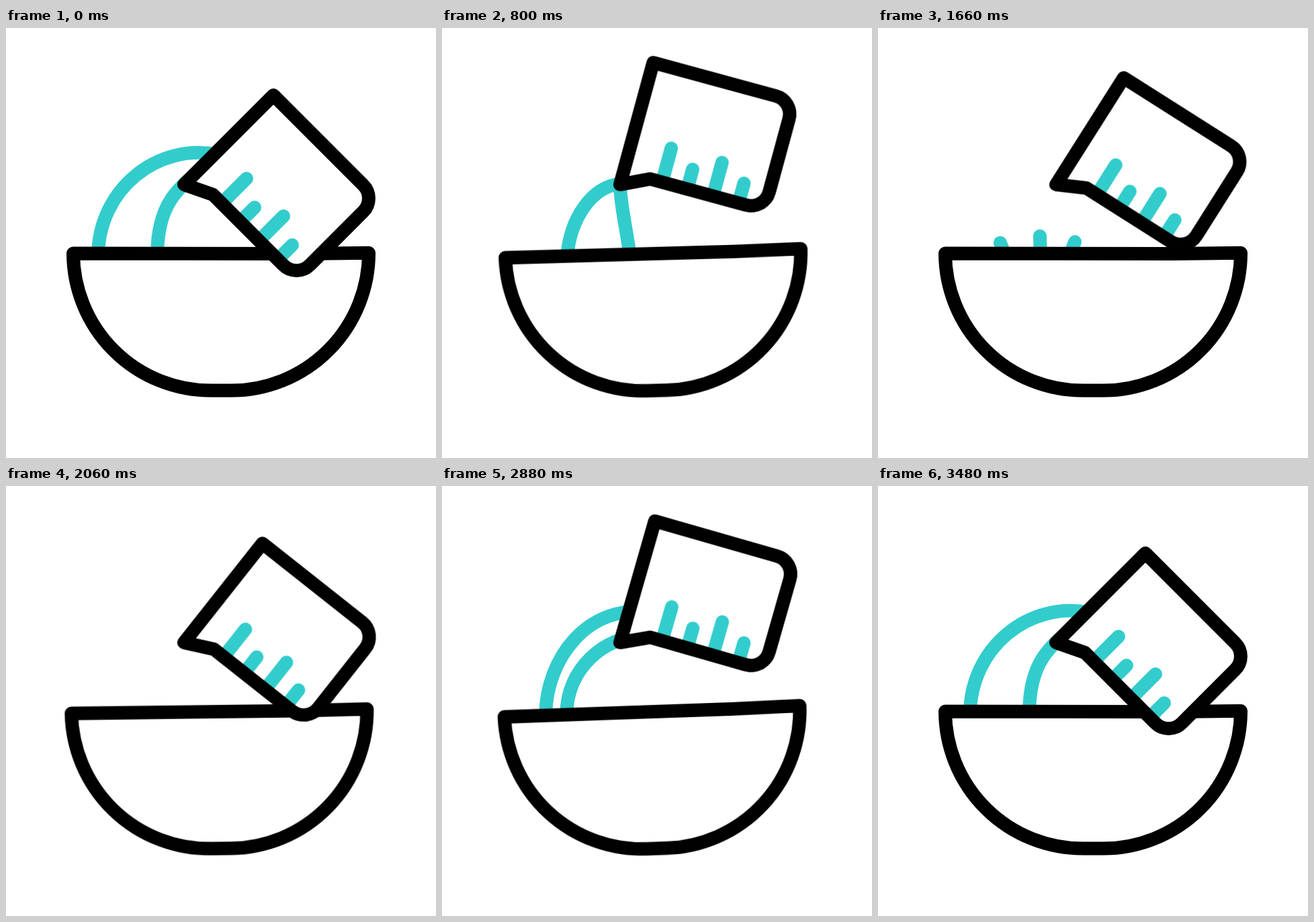
Write an HTML page that moves like this. It is 640 px wide and 640 px high and loops after 3540 ms.

```html
<!DOCTYPE html>
<html lang="en">
<head>
<meta charset="utf-8">
<title>Pouring into a bowl</title>
<style>
  html, body { margin: 0; width: 100%; height: 100%; overflow: hidden; background: #fff; }
  svg { display: block; width: 100vw; height: 100vh; }
  svg * { stroke-linecap: round; stroke-linejoin: round; }

  .outline { fill: none; stroke: #000; stroke-width: 20; }
  .aqua { fill: none; stroke: #3cc; stroke-width: 20; }

  #cup, #bowl, #stream, #spray, #splash { animation: 3540ms linear infinite; }
  #cup { transform-origin: 265px 233px; animation-name: cup; }
  #bowl { fill: #fff; transform-origin: 320px 540px; animation-name: bowl; }
  #stream { animation-name: stream; }
  #spray { animation-name: spray; }
  #splash { animation-name: splash; }

  @keyframes cup {
    0% { transform: rotate(0deg); }
    5.65% { transform: rotate(0deg); animation-timing-function: cubic-bezier(.35, .1, .4, 1); }
    32.49% { transform: rotate(-35deg); }
    36.5% { transform: rotate(-35deg); animation-timing-function: ease-in-out; }
    54.4% { transform: rotate(0deg); animation-timing-function: ease-in-out; }
    66.1% { transform: rotate(-30deg); }
    71.19% { transform: rotate(-29.4deg); }
    81.92% { transform: rotate(-29deg); animation-timing-function: ease-in-out; }
    97.74%, 100% { transform: rotate(0deg); }
  }

  @keyframes bowl {
    0% { transform: rotate(0deg); }
    5.65% { transform: rotate(0deg); animation-timing-function: cubic-bezier(.35, .1, .4, 1); }
    35.59% { transform: rotate(-2.1deg); }
    36.16% { transform: rotate(-2.1deg); animation-timing-function: ease-in-out; }
    46.33% { transform: rotate(0deg); }
    52.54% { transform: rotate(0deg); animation-timing-function: ease-in-out; }
    66.1% { transform: rotate(-2.05deg); }
    76.27% { transform: rotate(-2.2deg); }
    81.92% { transform: rotate(-2.05deg); animation-timing-function: ease-in-out; }
    97.74%, 100% { transform: rotate(0deg); }
  }

  /* outer edge up to the spout, then inner edge back down */
  @keyframes stream {
    0% { d: path("M137 340C137 241 225 169 318 189L318 189C262 234 225 252 225 340"); }
    5.65% {
      d: path("M137 340C137 241 225 169 318 189L318 189C262 234 225 252 225 340");
      animation-timing-function: cubic-bezier(.4, 0, .7, .85);
    }
    22.6% { d: path("M186 342C190 285 222 236 265 232L265 232C265 262 275 300 280 342"); }
    35.59% {
      d: path("M208 345C218 305 242 287 265 287L265 287C285 287 298 308 306 345");
      animation-timing-function: ease-in;
    }
    40.68%, 67.22% { d: path("M216 360C222 355 246 350 265 350L265 350C284 350 302 355 308 360"); fill: transparent; }
    67.23% { d: path("M290 205C290 205 290 205 290 205L290 205C290 205 290 205 290 205"); fill: #3cc; }
    71.19% { d: path("M210 262C215 240 255 203 300 188L300 188C250 234 235 262 210 262"); fill: #3cc; }
    74% { fill: transparent; }
    80.79% { d: path("M155 340C155 262 215 170 318 189L300 222C240 224 184 272 184 340"); }
    88.7% { d: path("M148 340C148 260 205 172 318 189L298 227C246 227 203 278 203 340"); }
    98.31%, 100% { d: path("M137 340C137 241 225 169 318 189L318 189C262 234 225 252 225 340"); fill: transparent; }
  }

  @keyframes spray {
    0%, 67.22% { opacity: 0; stroke-dasharray: 0 60; stroke-dashoffset: 0; }
    67.23% { opacity: 1; stroke-dasharray: 0 60; stroke-dashoffset: 0; }
    71.19% { stroke-dasharray: 10 60; stroke-dashoffset: -10; }
    75.71% { opacity: 1; stroke-dasharray: 0 60; stroke-dashoffset: -23; }
    75.72%, 100% { opacity: 0; stroke-dasharray: 0 60; stroke-dashoffset: -23; }
  }

  @keyframes splash {
    0%, 41.8% { opacity: 0; stroke-dasharray: 0 60; stroke-dashoffset: 0; }
    41.81% { opacity: 1; stroke-dasharray: 0 60; stroke-dashoffset: 0; }
    46.89% { stroke-dasharray: 10 60; stroke-dashoffset: 0; }
    50.85% { stroke-dasharray: 10 60; stroke-dashoffset: -8; }
    54.8% { opacity: 1; stroke-dasharray: 0 60; stroke-dashoffset: -20; }
    54.81%, 100% { opacity: 0; stroke-dasharray: 0 60; stroke-dashoffset: -20; }
  }
</style>
</head>
<body>
<svg viewBox="0 0 640 640">
  <g id="spray" class="aqua">
    <path pathLength="23" d="M263 248L153 234"/>
    <path pathLength="23" d="M275 226L178 168.5"/>
    <path pathLength="23" d="M287 200L239 131"/>
  </g>
  <g id="splash" class="aqua">
    <path pathLength="20" d="M194 350L170 290"/>
    <path pathLength="20" d="M242 350L240 270"/>
    <path pathLength="20" d="M281 350L305 287"/>
  </g>
  <path id="stream" class="aqua" d="M137 340C137 241 225 169 318 189L318 189C262 234 225 252 225 340"/>
  <path id="bowl" class="outline" d="M100 335.5L440 336L540 334.8A205 205 0 0 1 335 539.6H305A205 205 0 0 1 100 335.5Z"/>
  <g id="cup">
    <path fill="#fff" d="M265 233L398 100L540 253L432 362L308 248Z"/>
    <path class="aqua" d="M358 224L321 261M370 267L348.5 288.5M413 280L376.5 316.5M426 323L404.5 344.5"/>
    <path class="outline" d="M265 233L398 100L531.7 233.7A28 28 0 0 1 531.7 273.3L452.3 352.7A28 28 0 0 1 412.7 352.7L308 248Z"/>
  </g>
</svg>
</body>
</html>
```
